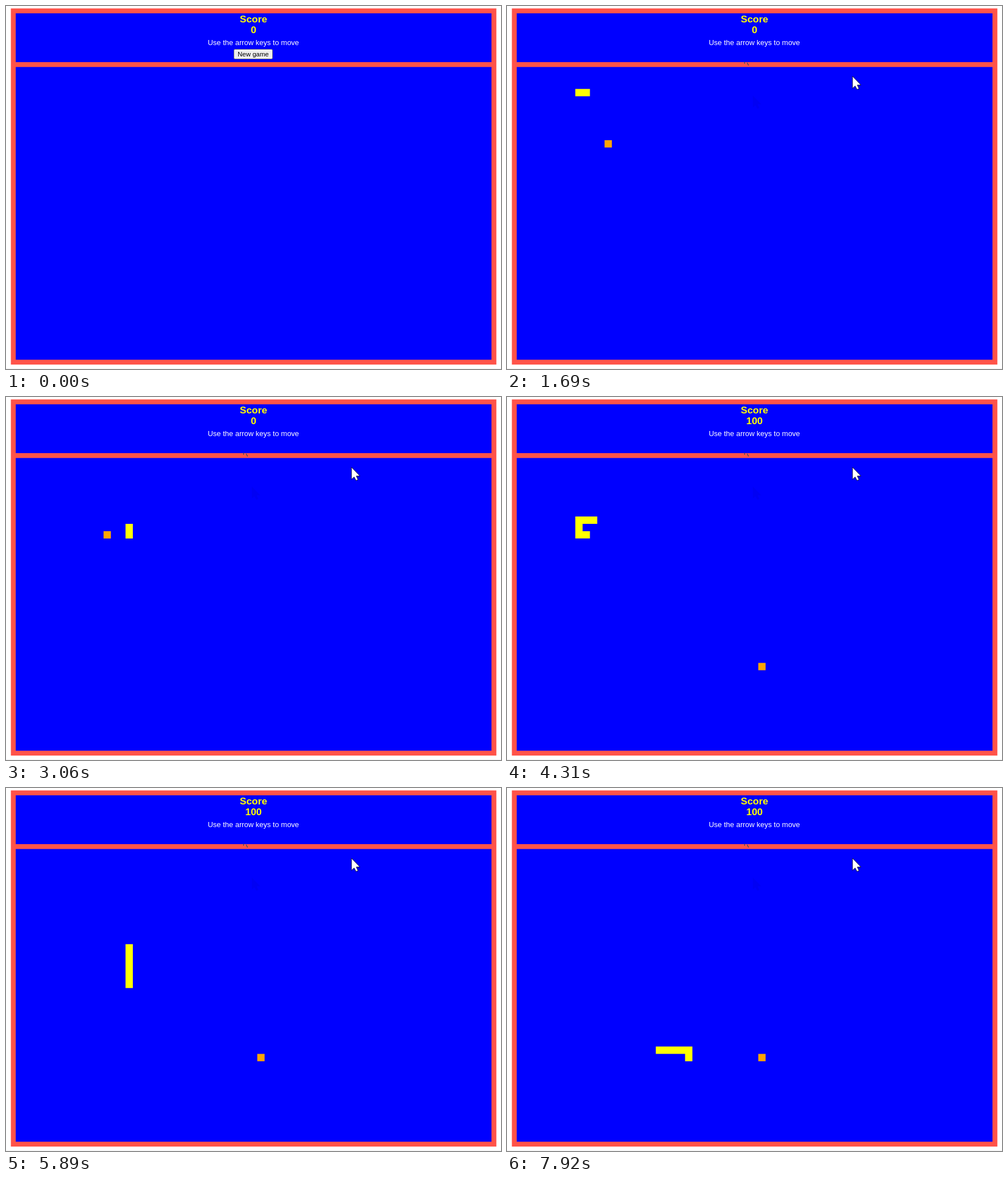
Recreate the animation shown at these times as an HTML page. Size 874 by 641 pixels, loop 7990 ms.

```html
<!DOCTYPE html>
<html lang="en">
<head>
<meta charset="utf-8">
<title>Snake</title>
<style>
  html, body { margin: 0; width: 100%; height: 100%; overflow: hidden; background: #fff; }
  svg { display: block; width: 874px; height: 641px; }
  text { font: 13px "Liberation Sans", Arial, sans-serif; text-anchor: middle; fill: #fff; }
  .score { font-weight: bold; font-size: 17.4px; fill: #ff0; }
  #button text { font-size: 11.5px; fill: #000; }
</style>
</head>
<body>
<svg viewBox="0 0 874 641">
  <defs><path id="arrow" d="M0 0V21.5L4.6 17.2 8 23.5 11.6 22 8.6 15.6H15Z"/></defs>
  <rect y="640" width="874" height="1" fill="#f0f0f0"/>
  <rect x="8.6" y="4.3" width="857.2" height="628.9" fill="#ff5349"/>
  <g fill="#00f">
    <rect x="17.2" y="12.9" width="840" height="86.2"/>
    <rect x="17.2" y="107.7" width="840" height="516.9"/>
  </g>
  <text class="score" x="437" y="28.5">Score</text>
  <text class="score" id="score" x="437" y="48.3">0</text>
  <text x="436.8" y="69">Use the arrow keys to move</text>
  <g id="button">
    <rect x="402.5" y="76.5" width="68" height="17" rx="2" fill="#efefef" stroke="#767676"/>
    <text x="436.5" y="89">New game</text>
  </g>
  <!-- smudges the pointer leaves behind -->
  <g id="smudge">
    <path d="M419.5 98.5v3.5M424 100l2.5 5" stroke="#355060" stroke-width="1.4"/>
    <use href="#arrow" x="434" y="158" fill="#0000f4"/>
  </g>
  <g transform="translate(17.2 107.7) scale(12.923)">
    <rect id="food" width="1" height="1" fill="#ffa500"/>
    <path id="snake" fill="none" stroke="#ff0" stroke-width="1" stroke-linecap="square"/>
  </g>
  <use id="cursor" href="#arrow" fill="#fff" stroke="#10103a"/>
</svg>
<script>
const LOOP = 7990, ENTER = 280, ARRIVE = 1000, CLICK = 1075, REST = 1300;
const STEP = 109.2;   // ms per move of the snake
const SHOT = 79;      // ms between screen refreshes
const EAT = 22;       // move on which the food is reached
const $ = id => document.getElementById(id);
const show = (id, on) => $(id).setAttribute("visibility", on ? "visible" : "hidden");
const mix = (a, b, p) => a + (b - a) * p;
const progress = (t, from, to) => Math.min(1, Math.max(0, (t - from) / (to - from)));

// Legs of the route, alternately across and down
const route = [[3, 3]];
[12, 7, -7, -2, 7, 19, 8, 1].forEach((leg, i) => {
  for (let n = Math.abs(leg); n > 0; n--) {
    const cell = [...route.at(-1)];
    cell[i % 2] += Math.sign(leg);
    route.push(cell);
  }
});

function pointer(t) {
  if (t < CLICK) {
    const p = progress(t, ENTER, ARRIVE);
    return [mix(857, 418, 1 - (1 - p) ** 2), mix(561, 82, p)];
  }
  const p = progress(t, CLICK, REST);
  return [mix(418, 610, p), mix(82, 124, p) - 130 * p * (1 - p)];
}

function draw(time) {
  const t = Math.floor((time - 8) / SHOT) * SHOT + 44;
  const started = t >= CLICK;
  const head = Math.min(route.length - 1, 1 + Math.floor((t - CLICK) / STEP));
  const eaten = head >= EAT;
  const length = eaten ? Math.min(6, head - EAT + 3) : 2;

  show("button", !started);
  show("food", started);
  show("snake", started);
  show("smudge", started);
  show("cursor", time >= ENTER);

  $("score").textContent = eaten ? 100 : 0;
  $("food").setAttribute("transform", eaten ? "translate(33 28)" : "translate(12 10)");
  $("cursor").setAttribute("transform", `translate(${pointer(t)})`);
  if (started) {
    const body = route.slice(head - length + 1, head + 1);
    $("snake").setAttribute("d", "M" + body.map(([x, y]) => `${x + .5} ${y + .5}`).join("L"));
  }
}

const origin = performance.now();
function frame() {
  draw((performance.now() - origin) % LOOP);
  requestAnimationFrame(frame);
}
frame();
</script>
</body>
</html>
```
